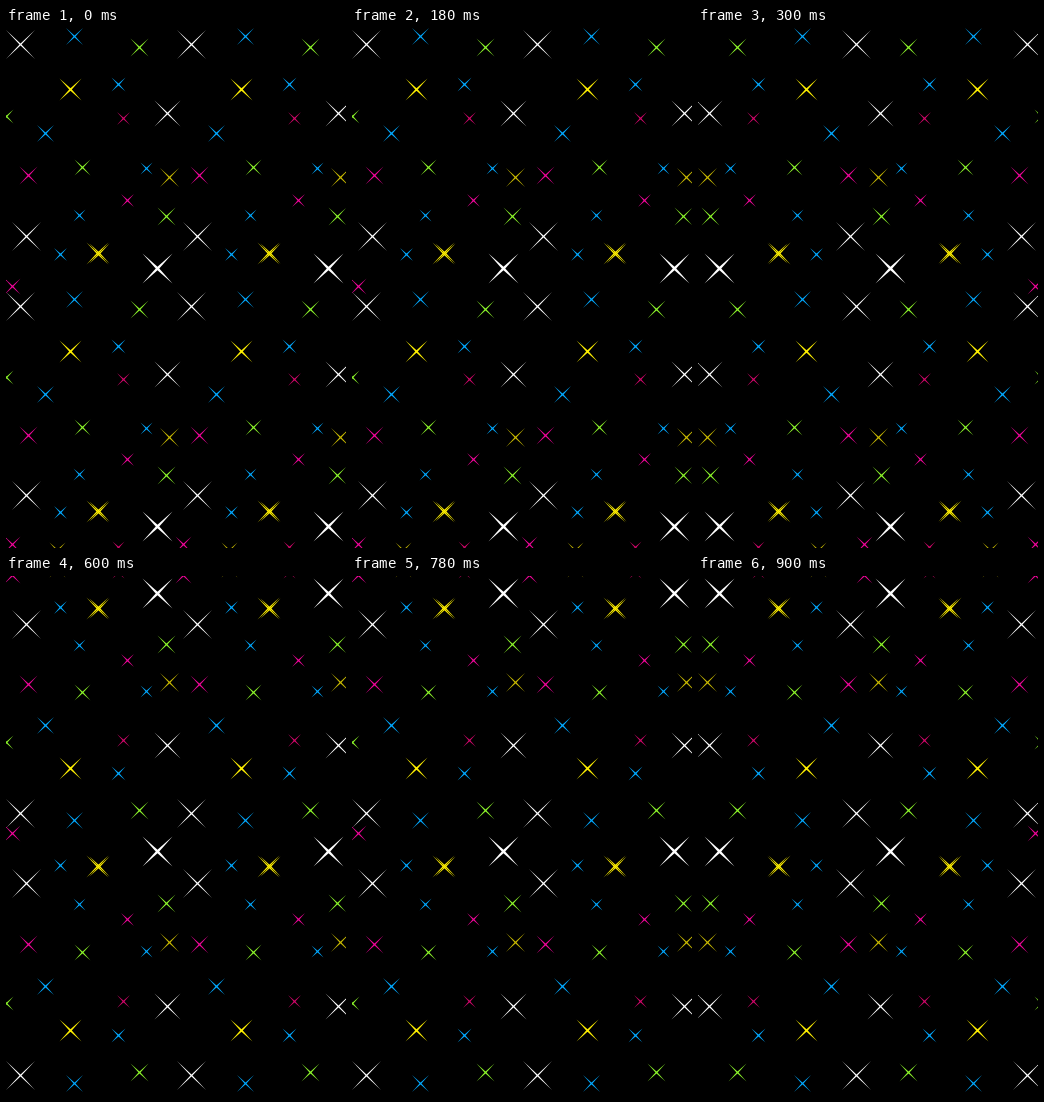
Animation, 340 px wide and 520 px high, one loop 1200 ms. Source, as an HTML page with a canvas:

```html
<!DOCTYPE html>
<html lang="en">
<head>
<meta charset="utf-8">
<title>Twinkling stars</title>
<style>
html, body { margin: 0; width: 100%; height: 100%; overflow: hidden; background: #000; }
canvas { display: block; }
</style>
</head>
<body>
<canvas id="sky" width="340" height="520"></canvas>
<script>
const ctx = document.getElementById('sky').getContext('2d');
const W = 340, H = 520, STEP = 300, TILE = 171;

const WHITE = '#fff', BLUE = '#00a8ff', GREEN = '#8cf52a',
      YELLOW = '#fff000', OLIVE = '#c8b900', PINK = '#f0059a', ROSE = '#d0066a';

// x, y, arm reach, half thickness at the centre, colour
const stars = [
  [14, 16, 14.5, 0.75, WHITE],
  [68, 8, 8.5, 0.75, BLUE],
  [133, 19, 9, 0.8, GREEN],
  [64, 61, 11, 0.9, YELLOW],
  [112, 56, 7, 0.85, BLUE],
  [117, 90, 6.5, 0.7, ROSE],
  [161, 85, 13, 0.75, WHITE],
  [39, 105, 8.5, 0.85, BLUE],
  [22, 147, 9, 0.8, PINK],
  [76, 139, 8, 0.75, GREEN],
  [140, 140, 6, 0.75, BLUE],
  [163, 149, 9.5, 0.75, OLIVE],
  [121, 172, 6.5, 0.75, PINK],
  [73, 187, 6, 0.75, BLUE],
  [160, 188, 9, 0.75, GREEN],
  [20, 208, 14.5, 0.75, WHITE],
  [54, 226, 6.5, 0.8, BLUE],
  [91, 225, 11, 0.8, YELLOW],
  [93, 225, 10, 0.7, YELLOW],
  [151, 240, 15, 1.25, WHITE]
];

// stars along the borders that do not repeat with the tile
const strays = [
  [0, 88, 7, 0.75, GREEN],
  [0, 349, 7, 0.75, GREEN],
  [6, 258, 8, 0.75, PINK],
  [6, 516, 8, 0.75, PINK],
  [177, 516, 8, 0.75, PINK],
  [112, 519, 6, 0.7, ROSE],
  [283, 519, 6, 0.7, ROSE],
  [51, 522, 8, 0.75, OLIVE],
  [223, 522, 8, 0.75, OLIVE]
];

const lowerRow = y => Math.round(262.8 + 0.98 * y);

function star(x, y, r, w, color) {
  const k = w * Math.SQRT1_2;
  ctx.fillStyle = color;
  for (const d of [1, -1]) {
    ctx.beginPath();
    ctx.moveTo(x - r, y - r * d);
    ctx.lineTo(x + k, y - k * d);
    ctx.lineTo(x + r, y + r * d);
    ctx.lineTo(x - k, y + k * d);
    ctx.fill();
  }
}

function draw(pose) {
  const flipX = pose % 2 === 1, flipY = pose > 1;
  ctx.setTransform(1, 0, 0, 1, 0, 0);
  ctx.fillStyle = '#000';
  ctx.fillRect(0, 0, W, H);
  ctx.setTransform(flipX ? -1 : 1, 0, 0, flipY ? -1 : 1,
                   flipX ? 343.5 : 0.5, flipY ? 515.5 : 0.5);
  for (const [x, y, ...look] of stars) {
    for (const left of [x, x + TILE]) {
      star(left, y, ...look);
      star(left, lowerRow(y), ...look);
    }
  }
  for (const s of strays) star(...s);
}

const start = performance.now();
let shown = -1;

function tick() {
  const pose = Math.floor((performance.now() - start) / STEP) % 4;
  if (pose !== shown) draw(shown = pose);
  requestAnimationFrame(tick);
}
tick();
</script>
</body>
</html>
```
